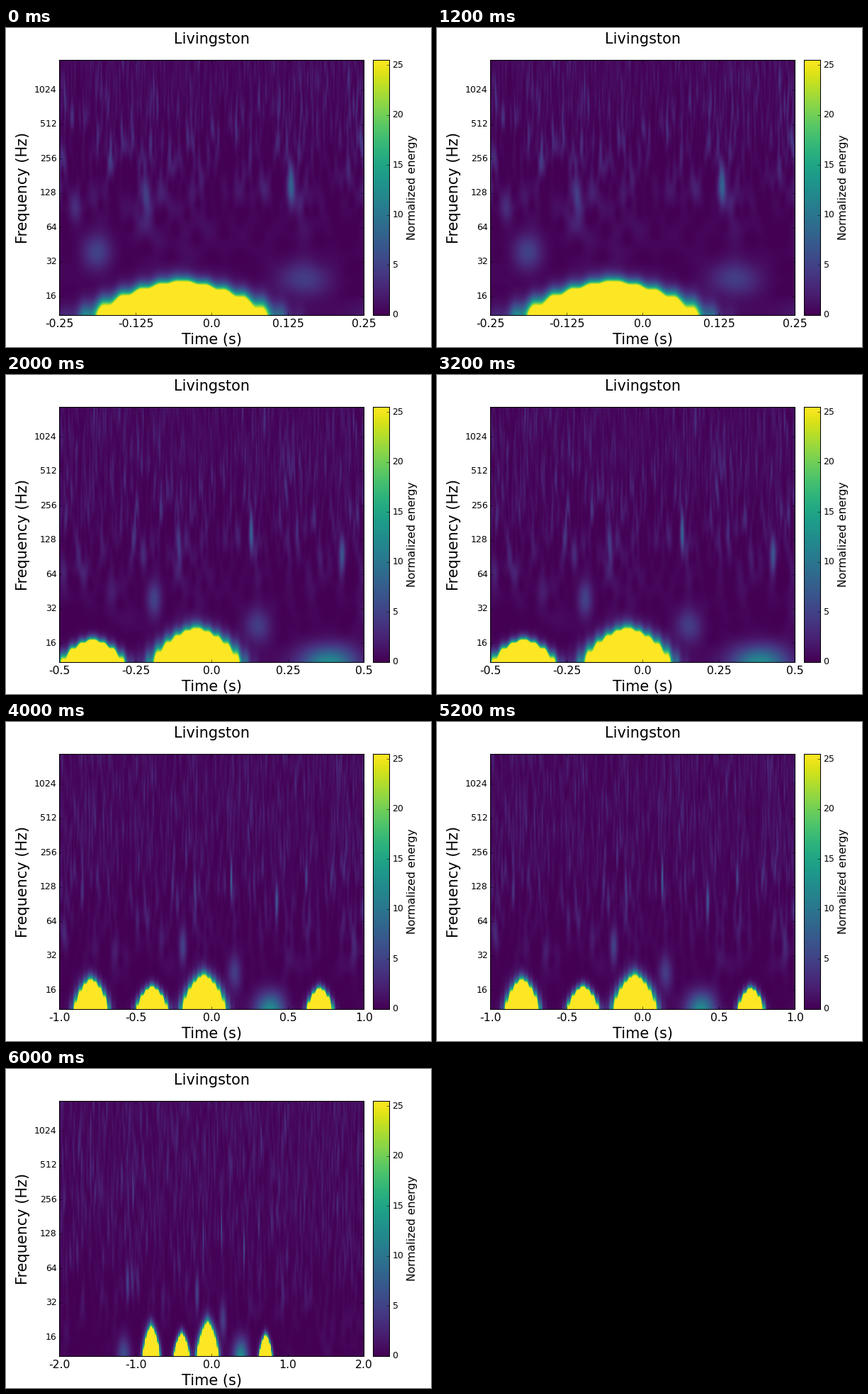
Animation, 600 px wide and 450 px high, one loop 8 s. Source, as a matplotlib script:

```python
import numpy as np
import matplotlib.pyplot as plt
from matplotlib.animation import FuncAnimation

WIDTH, HEIGHT, DPI = 600, 450, 75
LEFT, TOP, PLOT_W, PLOT_H = 75, 45, 430, 360
BOTTOM = TOP + PLOT_H
MAX_ENERGY = 25.5
OCTAVE = 48.5          # pixels per octave
Y_16HZ = 378.3
TILE = 1 / 32          # time step of the low-frequency tiles, s
RATE, SPAN = 4096, 4
HALF_SPANS = [0.25 * 2 ** k for k in range(4)]

# Saturated bursts: centre s, half width s, height px
BURSTS = [(-0.05, 0.137, 47), (-0.39, 0.097, 31), (-0.79, 0.107, 41), (0.712, 0.08, 29)]

# Main quiet transients: time s, frequency Hz, energy
TRANSIENTS = [(-0.188, 39, 5), (0.131, 143, 7), (-0.107, 118, 4), (0.428, 95, 6),
              (0.151, 23, 4), (0.384, 10.5, 12), (-1.1, 48, 5), (-1.15, 11, 6)]

rows = TOP + np.arange(PLOT_H) + 0.5
freqs = 2 ** (4 + (Y_16HZ - rows) / OCTAVE)


def noise_energy():
    """Constant-Q energy of white noise, one row per pixel line."""
    rng = np.random.default_rng(5)
    count = RATE * SPAN
    spectrum = rng.normal(size=count) + 1j * rng.normal(size=count)
    bins = np.arange(count) / SPAN
    energy = np.empty((PLOT_H, count))
    for i, f in enumerate(freqs):
        window = np.exp(-0.5 * ((bins - f) * 4.1 / f) ** 2)
        row = np.abs(np.fft.ifft(spectrum * window)) ** 2
        energy[i] = row / row.mean()
    level = np.interp(np.log2(freqs), [4, 8], [0.2, 0.85])
    return energy * level[:, None]


def transients(t):
    total = 0
    for centre, f, energy in TRANSIENTS:
        across = (t - centre) * f / 0.65
        along = np.log2(freqs / f)[:, None] * OCTAVE / 18
        total = total + energy * np.exp(-0.5 * (across ** 2 + along ** 2))
    return total


def bursts(t):
    """Loud low-frequency bursts with tiled, stepped edges."""
    edge = np.round(t / TILE)
    s = np.clip((t / TILE - edge) / 0.7 + 0.5, 0, 1)
    stepped = (edge - 0.5 + s * s * (3 - 2 * s)) * TILE
    rise = (BOTTOM - rows)[:, None]
    total = 0
    for centre, half, height in BURSTS:
        side = np.abs((stepped - centre) / half) ** 1.4
        total = total + MAX_ENERGY * np.exp(4.5 * (1 - side - (rise / height) ** 1.5))
    return total


def spectrogram(half_span):
    t = ((np.arange(PLOT_W) + 0.5) / PLOT_W * 2 - 1) * half_span
    clock = np.arange(RATE * SPAN) / RATE - SPAN / 2
    grain = np.array([np.interp(t, clock, row) for row in NOISE])
    padded = np.pad(grain, ((0, 0), (1, 1)), mode="edge")
    soft = (padded[:, :-2] + 2 * padded[:, 1:-1] + padded[:, 2:]) / 4
    return soft + transients(t) + bursts(t)


def panel(x, width):
    ax = fig.add_axes([x / WIDTH, 1 - BOTTOM / HEIGHT, width / WIDTH, PLOT_H / HEIGHT])
    ax.tick_params(direction="in", length=4, width=0.5, labelbottom=False, labelleft=False)
    for spine in ax.spines.values():
        spine.set_linewidth(1)
    return ax


def label(x, y, text, size, **style):
    style = {"ha": "center", "va": "baseline", **style}
    return fig.text(x / WIDTH, 1 - y / HEIGHT, text, fontsize=size, **style)


plt.rcParams["font.family"] = "DejaVu Sans"
NOISE = noise_energy()
VIEWS = [spectrogram(half) for half in HALF_SPANS]

fig = plt.figure(figsize=(WIDTH / DPI, HEIGHT / DPI), dpi=DPI, facecolor="white")

plot = panel(LEFT, PLOT_W)
image = plot.imshow(VIEWS[0], cmap="viridis", vmin=0, vmax=MAX_ENERGY, aspect="auto",
                    interpolation="nearest", extent=(0, PLOT_W, BOTTOM, TOP))
plot.tick_params(top=True, right=True)
plot.set_xticks(np.linspace(0, PLOT_W, 5))
tick_rows = Y_16HZ - OCTAVE * np.arange(7)
plot.set_yticks(tick_rows)

bar = panel(518, 23)
bar.imshow(np.linspace(1, 0, 256)[:, None], cmap="viridis", aspect="auto",
           extent=(0, 1, 0, MAX_ENERGY))
bar.set_xticks([])
bar.yaxis.tick_right()
bar.set_yticks(range(0, 26, 5))
bar.tick_params(labelright=False)

label(290.6, 22, "Livingston", 20)
label(290.6, 446, "Time (s)", 20)
vertical = {"rotation": 90, "rotation_mode": "anchor"}
label(29.7, 225, "Frequency (Hz)", 20, **vertical)
label(577.6, 225, "Normalized energy", 15, **vertical)
for k, y in enumerate(tick_rows):
    label(71.5, y, str(16 << k), 12, ha="right", va="center")
for value in range(0, 26, 5):
    y = BOTTOM - value / MAX_ENERGY * PLOT_H
    label(545.6, y, str(value), 12, ha="left", va="center")
time_labels = [label(LEFT + 0.6 + k * PLOT_W / 4, 422, "", 15) for k in range(5)]


def update(frame):
    image.set_data(VIEWS[frame])
    for k, item in enumerate(time_labels):
        item.set_text(str(HALF_SPANS[frame] * (k / 2 - 1)))
    return [image, *time_labels]


anim = FuncAnimation(fig, update, frames=4, interval=2000, repeat=True, repeat_delay=0)
plt.show()
```
